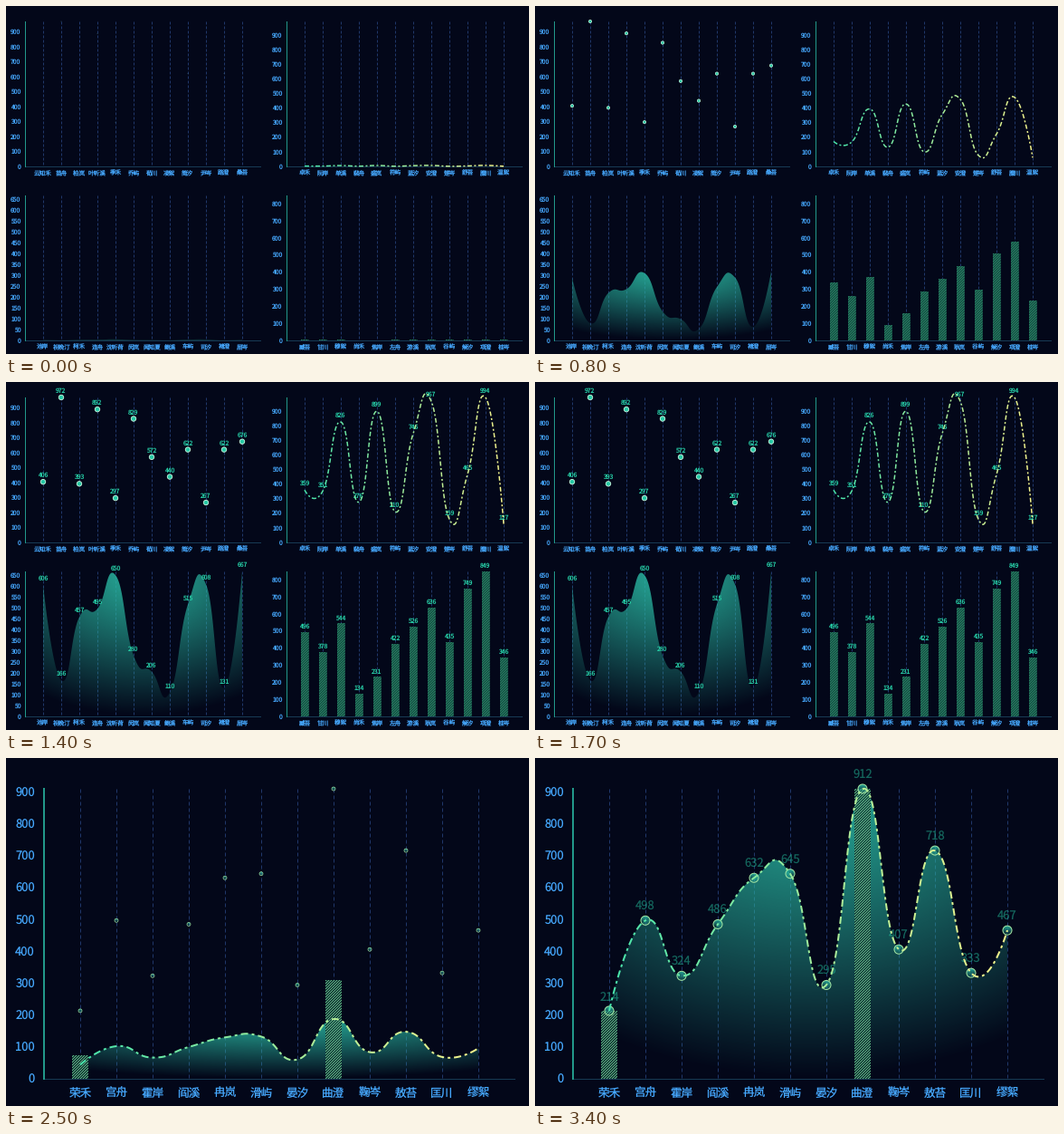
A matplotlib script that plays this animation: 578x384 px, repeating every 4000 ms.

```python
import numpy as np
import matplotlib.pyplot as plt
from matplotlib.animation import FuncAnimation
from matplotlib.collections import LineCollection
from matplotlib.patches import Circle, Polygon, Rectangle

W, H, DPI = 578, 384, 72
STEPS, INTERVAL = 40, 100
WIDE_START = 22

BG = "#030719"
TEXT = "#46a9ff"
AXIS_Y = "#22988a"
AXIS_X = "#173a54"
SPLIT = "#20376a"
LABEL = "#26cda6"
AREA = np.array([42, 184, 163]) / 255
LINE_FROM = np.array([72, 230, 172]) / 255
LINE_TO = np.array([246, 244, 140]) / 255

plt.rcParams["font.family"] = "Noto Sans CJK JP"
plt.rcParams["text.hinting"] = "none"
fig = plt.figure(figsize=(W / DPI, H / DPI), dpi=DPI, facecolor=BG)
ax = fig.add_axes([0, 0, 1, 1])
ax.set_xlim(0, W)
ax.set_ylim(H, 0)
ax.set_autoscale_on(False)
ax.axis("off")

moving = []


def keep(artist):
    moving.append(artist)
    return artist


def write(x, y, s, size, color, ha="center", **kw):
    """Text whose digits and ideographs are centred on y."""
    return ax.text(x, y + 0.37 * size, s, size=size, color=color, ha=ha,
                   va="baseline", **kw)


def in_out(t, power=3):
    t = np.clip(t, 0, 1)
    if t < 0.5:
        return 0.5 * (2 * t) ** power
    return 1 - 0.5 * (2 - 2 * t) ** power


def smooth(pts, samples=24):
    """Bezier spline whose handles are a quarter of the neighbours' chord."""
    handle = np.zeros_like(pts)
    handle[1:-1] = (pts[2:] - pts[:-2]) / 4
    t = np.linspace(0, 1, samples, endpoint=False)[:, None]
    u = 1 - t
    parts = [u**3 * a + 3 * u * u * t * (a + ha) + 3 * u * t * t * (b - hb) + t**3 * b
             for a, b, ha, hb in zip(pts, pts[1:], handle, handle[1:])]
    return np.vstack(parts + [pts[-1:]])


def shade(clip, extent, alpha, zorder):
    """Fill a patch with the area colour at varying opacity."""
    rgba = np.empty(alpha.shape + (4,))
    rgba[..., :3] = AREA
    rgba[..., 3] = np.clip(alpha, 0, 1)
    img = keep(ax.imshow(rgba, extent=extent, aspect="auto",
                         interpolation="bilinear", zorder=zorder))
    img.set_clip_path(clip)


class Chart:
    def __init__(self, left, top, gap, height, values, names, step, size, tick_gap, name_gap):
        self.values = np.array(values.split(), int)
        self.n = len(self.values)
        self.base = top + height
        self.scale = height / self.values.max()
        self.xs = left + gap * np.arange(1, self.n + 1)
        self.size = size
        right = left + gap * (self.n + 1)
        unit = gap / 40
        self.still = []
        add = self.still.append
        for x in self.xs:
            add(ax.plot([x, x], [top, self.base], color=SPLIT, lw=1,
                        dashes=(2 + 2 * unit, 1 + 2 * unit), zorder=1)[0])
        add(ax.plot([left, right], [self.base] * 2, color=AXIS_X, lw=1, zorder=1)[0])
        add(ax.plot([left, left], [top, self.base], color=AXIS_Y, lw=2 * unit, zorder=1)[0])
        for v in range(0, self.values.max() + 1, step):
            add(write(left - tick_gap, self.base - v * self.scale, str(v), size, TEXT, "right"))
        for x, name in zip(self.xs, names.split()):
            add(write(x, self.base + name_gap, name, size * 0.97, TEXT))

    def show(self, on):
        for artist in self.still:
            artist.set_visible(on)

    def points(self, k=1):
        return np.column_stack([self.xs, self.base - self.values * self.scale * k])

    def labels(self, alpha, offset, k=1):
        if alpha <= 0:
            return
        for (x, y), v in zip(self.points(k), self.values):
            keep(write(x, y - offset, str(v), self.size, LABEL, alpha=alpha, zorder=4))

    def line(self, k, lw, pattern):
        path = smooth(self.points(k))
        dist = np.r_[0, np.cumsum(np.hypot(*np.diff(path, axis=0).T))]

        def at(d):
            return np.column_stack([np.interp(d, dist, path[:, 0]),
                                    np.interp(d, dist, path[:, 1])])

        dashes, colors = [], []
        pos, i = 0, 0
        while pos < dist[-1]:
            end = min(pos + pattern[i % len(pattern)], dist[-1])
            if i % 2 == 0:
                seg = at(np.linspace(pos, end, 6))
                mix = (seg[2, 0] - self.xs[0]) / (self.xs[-1] - self.xs[0])
                dashes.append(seg)
                colors.append(LINE_FROM + (LINE_TO - LINE_FROM) * np.clip(mix, 0, 1))
            pos, i = end, i + 1
        keep(ax.add_collection(LineCollection(
            dashes, colors=colors, linewidths=lw, zorder=6), autolim=False))

    def area(self, k):
        path = smooth(self.points(k))
        x0, x1 = self.xs[0], self.xs[-1]
        outline = np.vstack([path, [x1, self.base], [x0, self.base]])
        clip = keep(ax.add_patch(Polygon(outline, fc="none", ec="none")))
        u, v = np.meshgrid(np.linspace(-0.5, 0.5, 90), np.linspace(0, 1, 90))
        shade(clip, (x0, x1, self.base, path[:, 1].min()), 0.97 * (1 - np.hypot(u, v)), 2)

    def bars(self, k, width, pitch, color, fill, lw=1.0, only=None):
        for i in only or range(self.n):
            left = self.xs[i] - width / 2
            h = self.values[i] * self.scale * k
            box = keep(ax.add_patch(Rectangle((left, self.base - h), width, h,
                                              fc=fill, ec="none", zorder=3)))
            rise = self.base - np.arange(0, h + width, pitch)
            strokes = [[(left, y + width), (left + width, y)] for y in rise]
            hatch = keep(ax.add_collection(LineCollection(
                strokes, colors=color, linewidths=lw, zorder=3), autolim=False))
            hatch.set_clip_path(box)

    def dots(self, k, radius, edge, lw, fill=None):
        r = radius * k
        fade = np.linspace(0.9, 0.1, 12)[:, None] * np.ones(12)
        for x, y in self.points():
            dot = keep(ax.add_patch(Circle((x, y), r, fc=fill or "none", ec=edge,
                                           lw=lw * np.sqrt(k), zorder=5)))
            if not fill:
                shade(dot, (x - r, x + r, y + r, y - r), fade, 4.5)


def small(left, top, values, names, step=100):
    return Chart(left, top, 20, 160, values, names, step, 6.8, 4.5, 7.5)


scatter = small(21, 17, "406 972 393 892 297 829 572 440 622 267 622 676",
                "云知禾 苗舟 柏岚 叶听溪 季禾 乔屿 荀川 凌絮 简汐 尹岑 路澄 桑苔")
curve = small(310, 17, "359 351 826 276 899 210 746 967 159 465 994 127",
              "卓禾 阮岸 单溪 裴舟 盛岚 符屿 蓝汐 安澄 楚岑 舒苔 滕川 温絮")
hills = small(21, 209, "606 166 457 495 650 280 206 110 515 608 131 667",
              "池岸 祝晚汀 柯禾 连舟 沈听荷 闵岚 闻知夏 鲍溪 车屿 司汐 褚澄 屈岑", 50)
columns = small(310, 209, "496 378 544 134 231 422 526 636 435 749 849 346",
                "臧苔 甘川 穆絮 尚禾 焦岸 左舟 游溪 耿岚 谷屿 解汐 项澄 桂岑")
wide = Chart(42, 34, 40, 320, "214 498 324 486 632 645 295 912 407 718 333 467",
             "荣禾 宫舟 霍岸 阎溪 冉岚 滑屿 晏汐 曲澄 鞠岑 敖苔 匡川 缪絮",
             100, 13, 10, 15)
quad = (scatter, curve, hills, columns)


def draw_quad(n):
    k_line = in_out(0.12 + 0.093 * n)
    k_bar = in_out(0.13 + 0.11 * n)
    alpha = np.clip((n - 5.5) / 4, 0, 1)
    offset = 2.5 + 5 * alpha
    scatter.dots(in_out(0.13 + 0.11 * n, 1.7), 2.7, "#c4f3dc", 0.9, "#25c8a4")
    curve.line(k_line, 1.5, (5, 2.5, 2, 2.5))
    hills.area(k_line)
    columns.bars(k_bar, 9, 2.8, "#2b8f6a", "#123f3c", 0.9)
    for chart in (scatter, curve, hills):
        chart.labels(alpha, offset)
    columns.labels(alpha, 4.5 + 2 * alpha, k_bar)


def draw_wide(n):
    k_line = in_out(0.1 + 0.0907 * n)
    k_bar = in_out(0.11 + 0.11 * n)
    wide.area(k_line)
    wide.bars(k_bar, 18, 3, "#6fd397", (0.02, 0.1, 0.14, 0.85), 0.9, only=(0, 7))
    wide.dots(in_out(0.11 + 0.11 * n, 1.7), 5, "#a4e6a4", 1)
    wide.line(k_line, 2, (8, 4, 3, 4))
    wide.labels(0.48 * np.clip((n - 7) / 4, 0, 1), 16)


def draw(i):
    while moving:
        moving.pop().remove()
    is_wide = i >= WIDE_START
    for chart in quad:
        chart.show(not is_wide)
    wide.show(is_wide)
    if is_wide:
        draw_wide(i - WIDE_START)
    else:
        draw_quad(max(0, i - 4))
    return []


anim = FuncAnimation(fig, draw, frames=STEPS, interval=INTERVAL, repeat=True,
                     repeat_delay=0, blit=False)
plt.show()
```
